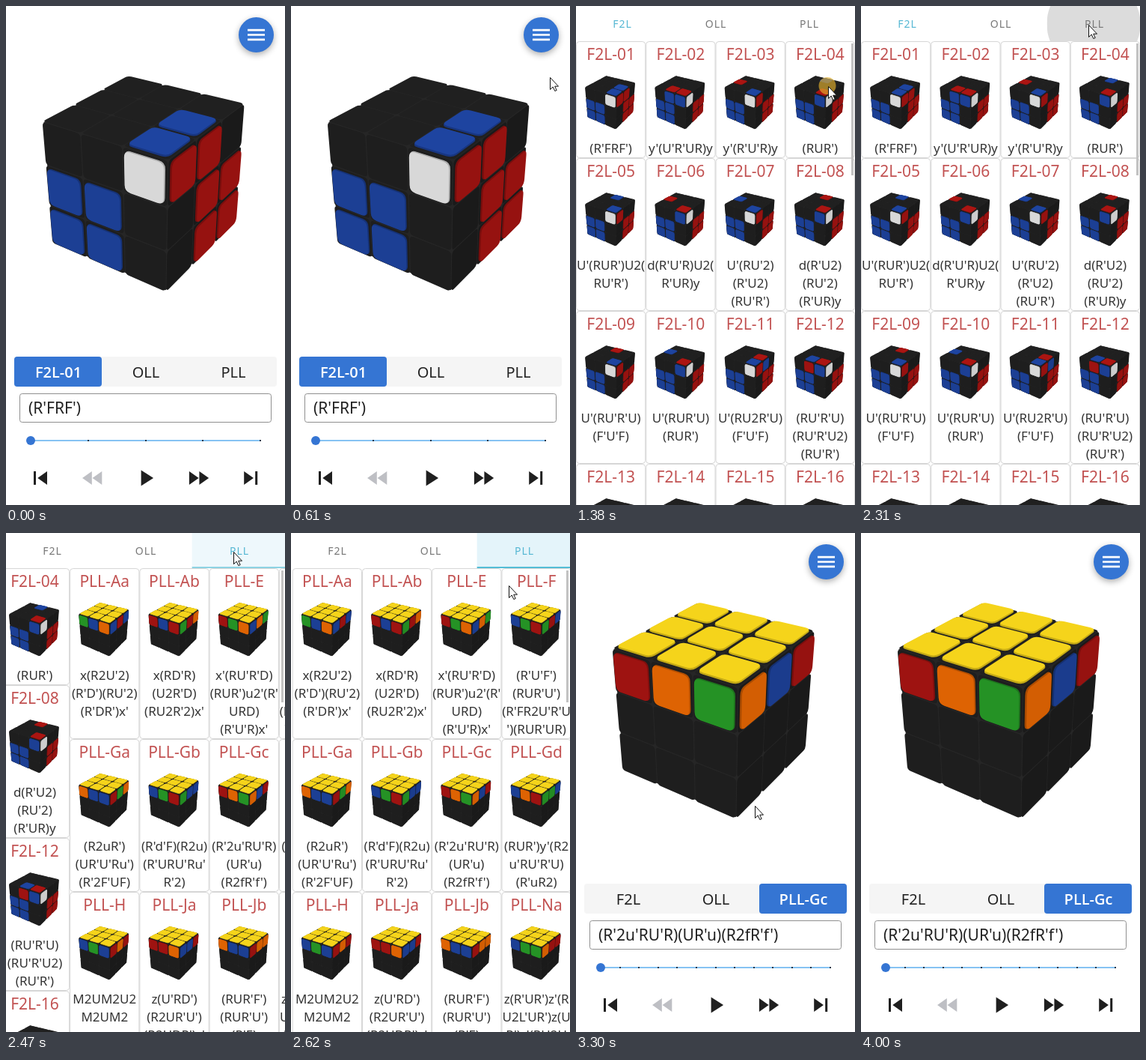
An HTML page with a canvas for the animation above (4.47 s loop, 373 px wide and 666 px high).

```html
<!DOCTYPE html>
<html lang="en">
<head>
<meta charset="utf-8">
<title>Cube trainer</title>
<style>
html, body { margin: 0; width: 100%; height: 100%; overflow: hidden; background: #fff; }
canvas { display: block; width: 373px; height: 666px; }
</style>
</head>
<body>
<canvas id="stage"></canvas>
<script>
const W = 373, H = 666, LOOP = 4470;
const canvas = document.getElementById('stage');
const ctx = canvas.getContext('2d');
const dpr = window.devicePixelRatio || 1;
canvas.width = Math.round(W * dpr);
canvas.height = Math.round(H * dpr);

const BLUE = '#3575d3', CYAN = '#55b7d3';
const clamp = v => Math.max(0, Math.min(1, v));
const ramp = (t, from, to) => clamp((t - from) / (to - from));

// The picture only advances in bursts: [first, last, count]
const BURSTS = [[70, 150, 2], [380, 840, 7], [920, 1380, 7], [1460, 1460, 1], [1760, 1990, 4],
  [2160, 2620, 7], [2700, 3150, 7], [3240, 3300, 2], [3620, 4000, 6]];
const TICKS = [0];
for (const [first, last, n] of BURSTS) {
  for (let i = 0; i < n; i++) {
    TICKS.push(n > 1 ? Math.floor((first + (last - first) * i / (n - 1)) / 10) * 10 : first);
  }
}
const snap = t => TICKS.reduce((best, v) => v <= t ? v : best, 0);

function text(str, x, y, size, color, align = 'center', weight = 400, spacing = 0) {
  const family = weight > 400 ? '"Open Sans", "Noto Sans"' : '"Noto Sans", "Open Sans"';
  ctx.font = `${weight} ${size}px ${family}, sans-serif`;
  ctx.letterSpacing = spacing + 'px';
  ctx.textAlign = align;
  ctx.fillStyle = color;
  ctx.fillText(str, x, y);
  ctx.letterSpacing = '0px';
}
function rect(x, y, w, h, color) {
  ctx.fillStyle = color;
  ctx.fillRect(x, y, w, h);
}
function box(x, y, w, h, r) {
  ctx.beginPath();
  ctx.roundRect(x, y, w, h, r);
}
function disc(x, y, r, color) {
  ctx.fillStyle = color;
  ctx.beginPath();
  ctx.arc(x, y, r, 0, Math.PI * 2);
  ctx.fill();
}
function faded(alpha, draw) {
  ctx.save();
  ctx.globalAlpha *= alpha;
  draw();
  ctx.restore();
}

// ---- Icons on a 24 unit grid ----
const ICONS = {
  menu: 'M3 18h18v-2H3zM3 13h18v-2H3zM3 6v2h18V6z',
  close: 'M19 6.4L17.6 5 12 10.6 6.4 5 5 6.4 10.6 12 5 17.6 6.4 19 12 13.4 17.6 19 19 17.6 13.4 12z',
  list: 'M19 3h-4.2a3 3 0 0 0-5.6 0H5a2 2 0 0 0-2 2v14a2 2 0 0 0 2 2h14a2 2 0 0 0 2-2V5a2 2 0 0 0-2-2z' +
    'M12 3a1 1 0 1 1 0 2a1 1 0 1 1 0-2zM14 17H7v-2h7zM17 13H7v-2h10zM17 9H7V7h10z',
  pad: 'M15 7.5V2H9v5.5l3 3zM7.5 9H2v6h5.5l3-3zM9 16.5V22h6v-5.5l-3-3zM16.5 9l-3 3 3 3H22V9z',
  tune: 'M3 17v2h6v-2zM3 5v2h10V5zM13 21v-2h8v-2h-8v-2h-2v6zM7 9v2H3v2h4v2h2V9zM21 13v-2H11v2zM15 9h2V7h4V5h-4V3h-2z',
  flip: 'M3 5v14a2 2 0 0 0 2 2h4v-2H5V5h4V3H5a2 2 0 0 0-2 2zM11 23h2V1h-2zM15 21h2v-2h-2zM15 5h2V3h-2z' +
    'M19 9h2V7h-2zM19 13h2v-2h-2zM19 17h2v-2h-2zM19 3v2h2a2 2 0 0 0-2-2zM19 21a2 2 0 0 0 2-2h-2z',
  code: 'M9.4 16.6L4.8 12l4.6-4.6L8 6l-6 6 6 6zM14.6 16.6l4.6-4.6-4.6-4.6L16 6l6 6-6 6z',
  first: 'M6 6h2v12H6zM9.5 12l8.5 6V6z',
  back: 'M11 18V6l-8.5 6zM11.5 12l8.5 6V6z',
  play: 'M8 5v14l11-7z',
  forward: 'M4 18l8.5-6L4 6zM13 6v12l8.5-6z',
  last: 'M6 18l8.5-6L6 6zM16 6v12h2V6z'
};
for (const name in ICONS) ICONS[name] = new Path2D(ICONS[name]);

function icon(name, x, y, scale, color, turn = 0) {
  ctx.save();
  ctx.translate(x, y);
  ctx.rotate(turn);
  ctx.scale(scale, scale);
  ctx.translate(-12, -12);
  ctx.fillStyle = color;
  ctx.fill(ICONS[name], 'evenodd');
  ctx.restore();
}

// ---- Cube: a runs left, b runs right, c runs down from the near top corner ----
function project(a, b, c) {
  const w = 1 + .134 * a + .183 * b + .122 * c;
  return [(217 - 162.6 * a + 160.4 * b + 23.1 * c) / w,
    (206 - 31.4 * a - 52.2 * b + 222.6 * c) / w];
}
const FACES = {
  R: { at: (i, j, h) => project(-h, i / 3, j / 3), body: '#1a1a1a', light: .95 },
  L: { at: (i, j, h) => project(i / 3, -h, j / 3), body: '#1e1e1e', light: 1 },
  T: { at: (i, j, h) => project(i / 3, j / 3, -h), body: '#202020', light: 1.08 }
};
const PAINT = {
  r: [158, 19, 17], b: [28, 63, 148], w: [216, 216, 216],
  o: [222, 99, 3], g: [37, 146, 37], y: [227, 196, 25]
};
const shade = (key, k) => `rgb(${PAINT[key].map(v => Math.min(255, Math.round(v * k))).join()})`;

// One rounded square of a face, lifted by h
function tile(face, i, j, inset, r, h, color) {
  const lo = inset, hi = 1 - inset;
  const p = (x, y) => face.at(i + x, j + y, h);
  ctx.beginPath();
  for (const [x, y, dx, dy] of [[lo, lo, 1, 0], [hi, lo, 0, 1], [hi, hi, -1, 0], [lo, hi, 0, -1]]) {
    ctx.lineTo(...p(x - dy * r, y + dx * r));
    ctx.quadraticCurveTo(...p(x, y), ...p(x + dx * r, y + dy * r));
  }
  ctx.closePath();
  ctx.fillStyle = color;
  ctx.fill();
}

function cube(stickers) {
  const m = .008, n = 1 - m;
  ctx.beginPath();
  for (const p of [[n, m, m], [n, n, m], [m, n, m], [m, n, n], [m, m, n], [n, m, n]]) {
    ctx.lineTo(...project(...p));
  }
  ctx.fillStyle = '#262626';
  ctx.fill();
  for (const face of Object.values(FACES)) {
    for (let k = 0; k < 9; k++) tile(face, k % 3, Math.floor(k / 3), .012, .09, 0, face.body);
  }
  for (const name in FACES) {
    const face = FACES[name];
    for (const [side, k, color] of stickers) {
      if (side !== name) continue;
      const i = k % 3, j = Math.floor(k / 3);
      for (const h of [.002, .007]) tile(face, i, j, .055, .14, h, shade(color, face.light * .8));
      tile(face, i, j, .06, .14, .014, shade(color, face.light));
    }
  }
}

// ---- Cases: [name, colours, extra stickers, algorithm lines] ----
const F2L = [
  ['F2L-01', 'bwr', 'T3b R1r', "(R'FRF')"],
  ['F2L-02', 'rbw', 'T1r L1b', "y'(U'R'UR)y"],
  ['F2L-03', 'bwr', 'T5r', "y'(R'U'R)y"],
  ['F2L-04', 'rbw', 'T7b', "(RUR')"],
  ['F2L-05', 'bwr', 'T7b', "U'(RUR')U2( RU'R')"],
  ['F2L-06', 'rbw', 'T5r', "d(R'U'R)U2( R'UR)y"],
  ['F2L-07', 'bwr', 'T5b', "U'(RU'2) (R'U2) (RU'R')"],
  ['F2L-08', 'rbw', 'T7r', "d(R'U2) (RU'2) (R'UR)y"],
  ['F2L-09', 'bwr', 'T7r', "U'(RU'R'U) (F'U'F)"],
  ['F2L-10', 'rbw', 'T5b', "U'(RUR'U) (RUR')"],
  ['F2L-11', 'bwr', 'T3r R1b', "U'(RU2R'U) (F'U'F)"],
  ['F2L-12', 'rbw', 'T1b L1r', "(RU'R'U) (RU'R'U2) (RU'R')"],
  ['F2L-13', 'bwr', '', ''], ['F2L-14', 'rbw', '', ''],
  ['F2L-15', 'bwr', '', ''], ['F2L-16', 'rbw', '', '']
];
const PLL = [
  ['PLL-Aa', 'gbobrb', '', "x(R2U'2) (R'D')(RU'2) (R'DR')x'"],
  ['PLL-Ab', 'rbrgro', '', "x(RD'R) (U2R'D) (RU2R'2)x'"],
  ['PLL-E', 'rgobog', '', "x'(RU'R'D) (RUR')u2'(R' URD) (R'U'R)x'"],
  ['PLL-F', 'bgrgrb', '', "(R'U'F') (RUR'U') (R'FR2U'R'U ')(RUR'UR)"],
  ['PLL-Ga', 'obbrgo', '', "(R2uR') (UR'U'Ru') (R'2F'UF)"],
  ['PLL-Gb', 'bgrgbb', '', "(R'd'F)(R2u) (R'URU'Ru' R'2)"],
  ['PLL-Gc', 'rogobr', '', "(R'2u'RU'R) (UR'u) (R2fR'f')"],
  ['PLL-Gd', 'borggb', '', "(RUR')y'(R2 u'RU'R'U) (R'uR2)"],
  ['PLL-H', 'bgbror', '', "M2UM2U2 M2UM2"],
  ['PLL-Ja', 'rrobbr', '', "z(U'RD') (R2UR'U') (R2UDR')z'"],
  ['PLL-Jb', 'obbroo', '', "(RUR'F') (RUR'U') (R'F)"],
  ['PLL-Na', 'bggorr', '', "z(R'UR')z'(R U2L'UR')z(U R')z'(RU2U"]
];

function stickersOf([name, colors, extra]) {
  const out = [];
  const put = codes => codes.split(' ').filter(Boolean).forEach(c => out.push([c[0], +c[1], c[2]]));
  const paint = cells => put(cells.split(' ').map((c, i) => c + colors[i]).join(' '));
  if (name[0] === 'F') {
    put('L4b L5b L7b L8b R4r R5r R7r R8r');
    paint('T0 L0 R0');
    put(extra);
  } else {
    for (let k = 8; k >= 0; k--) out.push(['T', k, 'y']);
    paint('L2 L1 L0 R0 R1 R2');
  }
  return out;
}

function grid(cases, left) {
  const cw = W / 4;
  let top = 47;
  for (let row = 0; row < cases.length / 4; row++) {
    const items = cases.slice(row * 4, row * 4 + 4);
    const h = 132 + 24 * Math.max(...items.map(c => c[3].split(' ').length));
    items.forEach((item, col) => {
      const x = left + col * cw, mid = x + cw / 2;
      box(x + .5, top + .5, cw - 1, h - 1, 4);
      ctx.lineWidth = 1;
      ctx.strokeStyle = '#d6d6d6';
      ctx.stroke();
      text(item[0], mid, top + 25, 21, '#c25252');
      ctx.save();
      ctx.translate(x, top + 23);
      ctx.scale(.248, .248);
      cube(stickersOf(item));
      ctx.restore();
      item[3].split(' ').forEach((line, i) => text(line, mid, top + 149 + 24 * i, 17, '#333'));
    });
    top += h;
  }
}

function catalog(t) {
  rect(0, 0, W, H, '#fff');
  const slide = t < 2330 ? 1 : (1 - ramp(t, 2320, 2680)) ** 3;
  if (slide > .005) grid(F2L, (slide - 1) * W);
  if (slide < 1) grid(PLL, slide * W);
  rect(368, 50, 3, 176, '#c2c2c2');

  rect(0, 0, W, 47, '#fff');
  const picked = ramp(t, 2330, 2540), third = W / 3;
  faded(picked, () => {
    rect(2 * third, 0, third, 47, '#e4f4fa');
    rect(2 * third, 45, third, 2, '#53bdd6');
  });
  if (t >= 2160 && t < 2460) {
    ctx.save();
    ctx.beginPath();
    ctx.rect(2 * third, 0, third, 47);
    ctx.clip();
    ctx.globalAlpha *= 1 - ramp(t, 2320, 2460);
    disc(311, 24, 66 * (1 - (1 - ramp(t, 2140, 2360)) ** 2), '#dcdcdc');
    ctx.restore();
  }
  const onPll = picked > .5;
  text('F2L', 62, 29, 14, onPll ? '#777' : CYAN, 'center', 400, 1);
  text('OLL', 187, 29, 14, '#777', 'center', 400, 1);
  text('PLL', 312, 29, 14, onPll ? CYAN : '#777', 'center', 400, 1);
}

// ---- Player screen ----
function raised(x, y, r, color) {
  ctx.save();
  ctx.shadowColor = 'rgba(0,0,0,.32)';
  ctx.shadowBlur = 8 * dpr;
  ctx.shadowOffsetY = 3 * dpr;
  disc(x, y, r, color);
  ctx.restore();
}

function speedDial(t) {
  const live = t < 1380;
  const open = live ? ramp(t, 802, 960) : 0;
  if (open) {
    ['list', 'pad', 'tune', 'flip', 'code'].forEach((name, i) => {
      const s = 1 - (1 - clamp((t - 802 - 30 * i) / 200)) ** 2;
      if (!s) return;
      const y = 105 + 54.2 * i;
      faded(s, () => {
        raised(334, y, 21 * s, '#fff');
        icon(name, 334, y, 1.1 * s, BLUE);
      });
    });
  }
  raised(334.5, 38.5, 23.5, live && t >= 690 ? '#5690dd' : BLUE);
  faded(1 - open, () => icon('menu', 334.5, 38.5, 1.28, '#fff', open * Math.PI / 4));
  faded(open, () => icon('close', 334.5, 38.5, 1.28, '#fff', (open - 1) * Math.PI / 4));
}

function player(t) {
  rect(0, 0, W, H, '#fff');
  const pll = t >= 3160;
  const item = pll ? PLL[6] : F2L[0];
  cube(stickersOf(item));
  speedDial(t);

  const active = pll ? 2 : 0;
  box(11, 468, 351, 40, 4);
  ctx.fillStyle = '#f5f5f5';
  ctx.fill();
  ['F2L', 'OLL', 'PLL'].forEach((label, i) => {
    const x = 11 + 117 * i, on = i === active;
    if (on) {
      box(x, 468, 117, 40, 4);
      ctx.fillStyle = BLUE;
      ctx.fill();
    }
    text(on ? item[0] : label, x + 59, 496, 20, on ? '#fff' : '#222', 'center', on ? 600 : 400);
  });

  box(18.5, 517.5, 336, 38, 3);
  ctx.lineWidth = 1;
  ctx.strokeStyle = '#8f8f8f';
  ctx.stroke();
  text(item[3].replaceAll(' ', ''), 30, 544, 21, '#222', 'left');

  rect(33, 579, 307, 2, '#86c3f3');
  const moves = pll ? 12 : 4;
  for (let i = 1; i <= moves; i++) rect(Math.round(32 + 307 * i / moves), 579, 2, 2, '#25364a');
  disc(33, 580, 6, BLUE);

  ['first', 'back', 'play', 'forward', 'last'].forEach((name, i) =>
    icon(name, 46 + 70.3 * i, 630, 1.5, name === 'back' ? '#bebfc4' : '#1f1f1f'));
}

// ---- Pointer ----
const PATH = [[380, 366, 195], [760, 335, 42], [860, 335, 44], [990, 335, 72], [1150, 337, 107], [1680, 337, 107],
  [1990, 304, 25], [2460, 304, 25], [2620, 291, 70], [3000, 239, 364], [3540, 239, 364], [4000, 316, 666]];
const CLICKS = [[760, 900], [1220, 1440], [2160, 2300], [3080, 3230]];
const ARROW = new Path2D('M.5 .5V16.5L4.2 13L6.8 18.5L9.2 17.5L6.7 12.2H11.5Z');

function pointerAt(t) {
  if (t >= 70 && t < 150) return [342, 588];
  if (t < 380 || t >= 4000) return null;
  const n = PATH.findIndex(k => k[0] > t);
  const [t0, x0, y0] = PATH[n - 1], [t1, x1, y1] = PATH[n];
  const p = (t - t0) / (t1 - t0), e = p * p * (3 - 2 * p);
  return [Math.round(x0 + (x1 - x0) * e), Math.round(y0 + (y1 - y0) * e)];
}

function pointer(t) {
  const at = pointerAt(t);
  if (!at) return;
  const [x, y] = at;
  if (CLICKS.some(([from, to]) => t >= from && t < to)) disc(x - 1, y - .5, 11.5, 'rgba(228,176,44,.65)');
  ctx.save();
  ctx.translate(x, y);
  ctx.fillStyle = '#fff';
  ctx.strokeStyle = '#111';
  ctx.lineWidth = 1;
  ctx.fill(ARROW);
  ctx.stroke(ARROW);
  ctx.restore();
}

function draw(t) {
  ctx.setTransform(dpr, 0, 0, dpr, 0, 0);
  const cover = ramp(t, 1160, 1370) * (1 - ramp(t, 3170, 3300));
  if (cover < 1) player(t);
  if (cover > 0) faded(cover, () => catalog(t));
  pointer(t);
}

const start = performance.now();
let shown = -1;
function loop() {
  const t = snap((performance.now() - start) % LOOP);
  if (t !== shown) draw(shown = t);
  requestAnimationFrame(loop);
}
loop();
</script>
</body>
</html>
```
